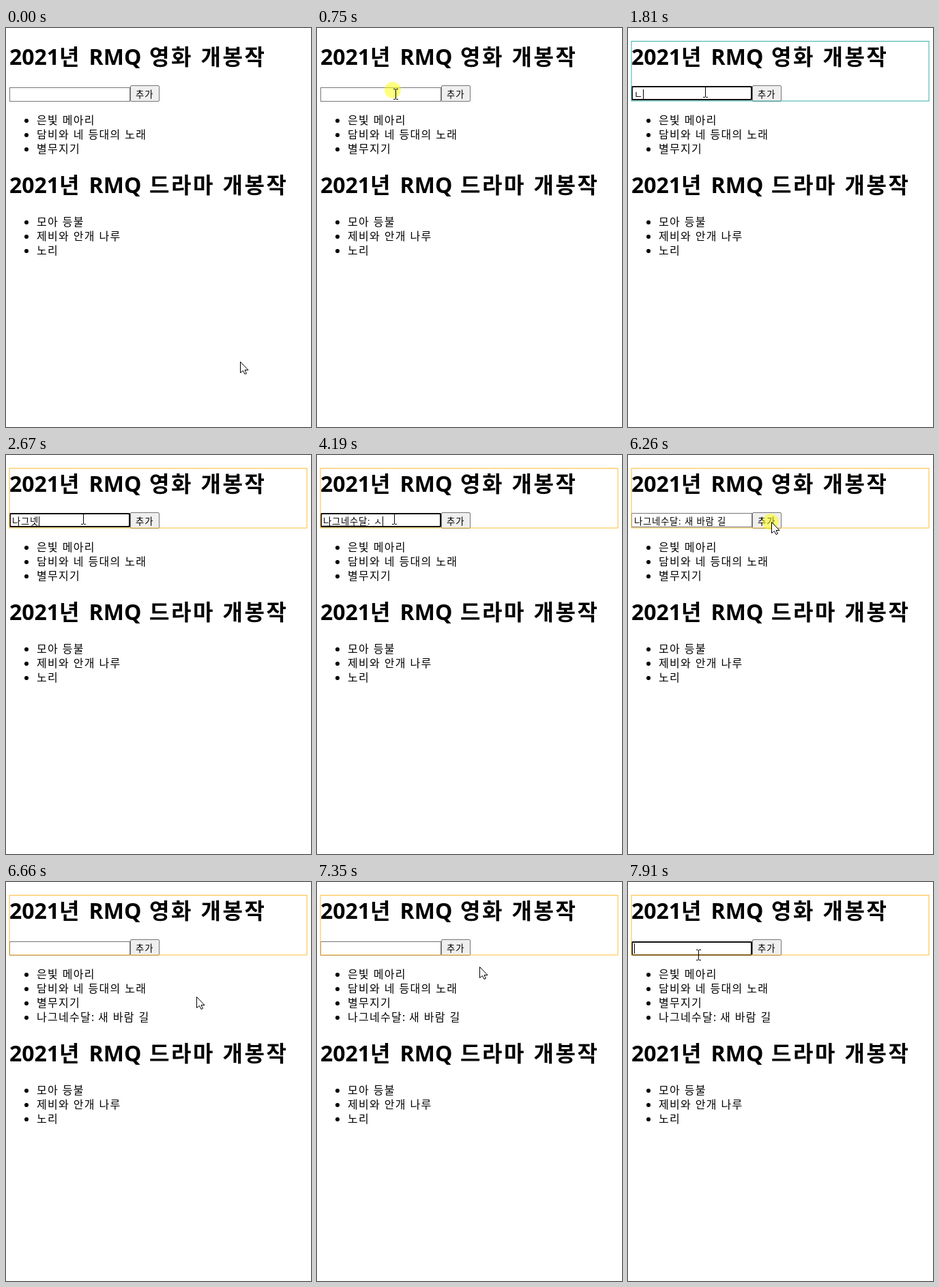
An HTML page with a canvas for the animation above (8 s loop, 447 by 585 pixels).

```html
<!DOCTYPE html>
<html lang="ko">
<head>
<meta charset="utf-8">
<style>
html, body { margin: 0; width: 100%; height: 100%; overflow: hidden; background: #fff; }
#stage { position: relative; width: 447px; height: 585px; overflow: hidden; color: #000;
  font-family: "Open Sans", "Noto Sans CJK KR", "Noto Sans CJK", sans-serif; }
#stage > * { position: absolute; box-sizing: border-box; }
.line { white-space: pre; line-height: 20px; word-spacing: .1em; }
.line i { font-style: normal; letter-spacing: .08em; line-height: 0; }
.head { font-weight: 700; }
.typed { letter-spacing: 1px; word-spacing: 0; }
.typed i { letter-spacing: .055em; }
#field { left: 5px; top: 87px; width: 177px; height: 21px; border: 1px solid #767676; }
#add { left: 182px; top: 84px; width: 43px; height: 24px; border: 1px solid #767676;
  border-radius: 2px; background: #efefef; }
canvas { left: 0; top: 0; }
</style>
</head>
<body>
<div id="stage"><div id="field"></div><div id="add"></div></div>
<script>
const LOOP = 8000;
const ADDED = 6390;
const stage = document.getElementById('stage');
const field = document.getElementById('field');

const markup = s => s.replace(/[ㄱ-힣]+/g, '<i>$&</i>');

// Places a line of text by its baseline.
function line(text, x, baseline, size, cls = '') {
  const el = document.createElement('div');
  el.className = 'line ' + cls;
  el.style.cssText = `left:${x}px;top:${baseline - 10 - size * 0.388}px;font-size:${size}px`;
  el.innerHTML = markup(text);
  stage.append(el);
  return el;
}

const hero = '나그네수달';
const movies = ['은빛 메아리', '담비와 네 등대의 노래', '별무지기'];
const dramas = ['모아 등불', '제비와 안개 나루', '노리'];

line('2021년 RMQ 영화 개봉작', 5, 54, 32, 'head');
line('추가', 190, 102, 13.33);
movies.forEach((s, i) => line(s, 45, 141 + 21 * i, 16));
const extra = line(hero + ': 새 바람 길', 45, 204, 16);
const lower = [line('2021년 RMQ 드라마 개봉작', 5, 242, 32, 'head'),
  ...dramas.map((s, i) => line(s, 45, 290 + 21 * i, 16))];
const typed = line('', 9, 102, 13.33, 'typed');

const canvas = document.createElement('canvas');
canvas.width = 447;
canvas.height = 585;
stage.append(canvas);
const ctx = canvas.getContext('2d');

// One entry per key press, as the input method composes the syllables.
const keys = [
  ...'ㄴ,나,낙,나그,나근,나그네,나그넷,나그네수,나그네숟,나그네수다,나그네수달'.split(','),
  ...':,: ,: ㅅ,: 새,: 새 ,: 새 ㅂ,: 새 바,: 새 발,: 새 바라,: 새 바람,: 새 바람 ,: 새 바람 ㄱ,: 새 바람 기,: 새 바람 길'
    .split(',').map(s => hero + s)
];
const keyTimes = [1810, 1880, 2010, 2140, 2270, 2400, 2670, 2740, 2870, 3070, 3400,
  3930, 4060, 4190, 4320, 4430, 4540, 4650, 4780, 4880, 4980, 5080, 5180, 5280, 5380];
const glow = ['#37afa9', '#80b393', '#abb67d', '#cfb965', '#dfba57', '#febc38'];

// Pointer moves: start, end, target x, target y
const moves = [
  [0, 740, 113, 94], [5600, 5601, 114, 94], [5840, 6220, 210, 98], [6370, 6650, 279, 168],
  [6650, 7000, 294, 216], [7000, 7490, 224, 101], [7490, 7640, 103, 107]
];
// Clicks: time, x, y
const clicks = [[750, 111, 91], [6190, 209, 98], [7640, 103, 104]];

const clamp = v => Math.max(0, Math.min(1, v));
const ease = p => p * p * (3 - 2 * p);

function pointer(t) {
  t = Math.floor(t / 70) * 70;
  let x = 343, y = 489;
  for (const [a, b, tx, ty] of moves) {
    const p = ease(clamp((t - a) / (b - a)));
    x += (tx - x) * p;
    y += (ty - y) * p;
  }
  return [Math.round(x), Math.round(y)];
}

function drawArrow(x, y) {
  const pts = [0, 0, 0, 16, 4, 13, 6.5, 18, 9, 17, 6.5, 12, 11.5, 12];
  ctx.beginPath();
  for (let i = 0; i < pts.length; i += 2) ctx.lineTo(x + 0.5 + pts[i], y + 0.5 + pts[i + 1]);
  ctx.closePath();
  ctx.fillStyle = '#fff';
  ctx.fill();
  ctx.strokeStyle = '#000';
  ctx.lineWidth = 1;
  ctx.stroke();
}

function drawBeam(x, y) {
  ctx.fillStyle = '#000';
  ctx.fillRect(x, y - 7, 1, 14);
  for (const edge of [y - 8, y + 7]) {
    ctx.fillRect(x - 3, edge, 3, 1);
    ctx.fillRect(x + 1, edge, 3, 1);
  }
}

function drawBullets(shift) {
  ctx.fillStyle = '#000';
  const rows = [136, 157, 178, 285 + shift, 306 + shift, 327 + shift];
  if (shift) rows.push(199);
  for (const y of rows) {
    ctx.beginPath();
    ctx.arc(30, y, 3, 0, 7);
    ctx.fill();
  }
}

function drawFocus(t, last, top, width) {
  ctx.strokeStyle = '#101010';
  ctx.lineWidth = 2;
  ctx.beginPath();
  ctx.roundRect(6, top + 1, 175, 19, 2);
  ctx.stroke();
  if ((t - last) % 1060 < 530) {
    ctx.fillStyle = '#000';
    ctx.fillRect(9 + Math.round(width), 90, 1, 15);
  }
}

function drawClicks(t) {
  for (const [at, x, y] of clicks) {
    const age = t - at;
    if (age < 0 || age >= 270) continue;
    ctx.fillStyle = `rgba(255,255,0,${0.5 * clamp((270 - age) / 140)})`;
    ctx.beginPath();
    ctx.arc(x, y, 12, 0, 7);
    ctx.fill();
  }
}

let shown = '';
function setTyped(text) {
  if (text === shown) return;
  shown = text;
  typed.innerHTML = markup(text);
}

function render(t) {
  const n = keyTimes.filter(k => k <= t).length;
  const added = t >= ADDED;
  const shift = added ? 21 : 0;
  setTyped(n && !added ? keys[n - 1] : '');
  // A filled field sits higher on the shared baseline than an empty one.
  const top = shown ? 85 : 87;
  field.style.top = top + 'px';
  extra.style.visibility = added ? 'visible' : 'hidden';
  for (const el of lower) el.style.transform = `translateY(${shift}px)`;

  ctx.clearRect(0, 0, 447, 585);
  drawBullets(shift);
  const refocused = t >= 7640;
  if (refocused || t >= 820 && t < 6190) {
    const last = refocused ? 7640 : n ? keyTimes[n - 1] : 820;
    drawFocus(t, last, top, shown ? typed.getBoundingClientRect().width : 0);
  }
  if (t >= 3930 && t < 6190) {
    ctx.fillStyle = '#555';
    for (let x = 9; x < 74; x += 2) ctx.fillRect(x, 103, 1, 1);
  }
  if (n) {
    ctx.strokeStyle = glow[Math.min(n, glow.length) - 1];
    ctx.lineWidth = 1;
    ctx.strokeRect(5, 19.44, 436, 87.56);
  }
  drawClicks(t);
  const [x, y] = pointer(t);
  const overField = x >= 5 && x < 182 && y >= top && y < top + 21;
  (overField ? drawBeam : drawArrow)(x, y);
}

const start = performance.now();
function tick() {
  render((performance.now() - start) % LOOP);
  requestAnimationFrame(tick);
}
tick();
</script>
</body>
</html>
```
